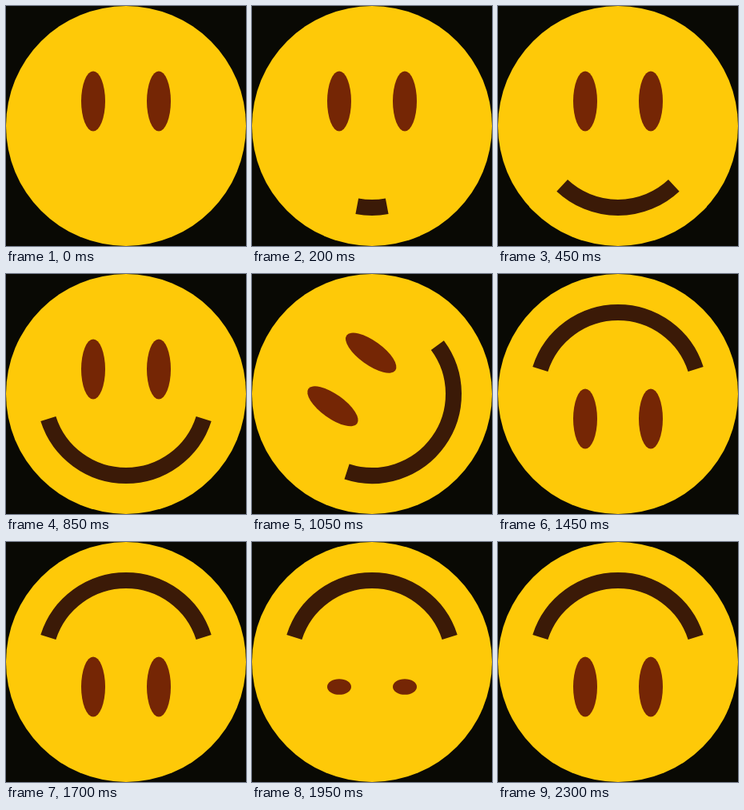
These frames come from a looping animation (300 px wide and 300 px high, 2350 ms). An HTML page:

```html
<!DOCTYPE html>
<html lang="en">
<head>
<meta charset="utf-8">
<title>Smiley</title>
<style>
  html, body { margin: 0; width: 100%; height: 100%; overflow: hidden; background: #090904; }
  svg { display: block; width: 100vw; height: 100vh; }
</style>
</head>
<body>
<svg viewBox="-150 -150 300 300">
  <circle r="150" fill="#fec908"/>
  <g id="face">
    <ellipse class="eye" cx="-41" cy="-31" rx="15" fill="#752605"/>
    <ellipse class="eye" cx="41" cy="-31" rx="15" fill="#752605"/>
    <path id="smile" fill="none" stroke="#3b1a07" stroke-width="20"/>
  </g>
</svg>
<script>
const LOOP = 2350, STEP = 50;
const SMILE_RADIUS = 102, SMILE_HALF_ANGLE = 72.3;
const EYE_HEIGHT = 37.5, EYE_CLOSED = 0.26;
const face = document.getElementById('face');
const smile = document.getElementById('smile');
const eyes = document.querySelectorAll('.eye');

const progress = (t, start, end) => Math.min(1, Math.max(0, (t - start) / (end - start)));
const ease = p => (1 - Math.cos(Math.PI * p)) / 2;
const tween = (t, start, end) => ease(progress(t, start, end));

function smilePath(degrees) {
  const a = degrees * Math.PI / 180;
  const x = SMILE_RADIUS * Math.sin(a), y = SMILE_RADIUS * Math.cos(a);
  return `M${-x} ${y}A${SMILE_RADIUS} ${SMILE_RADIUS} 0 0 0 ${x} ${y}`;
}

function draw(t) {
  const grown = tween(t, 0, 800);
  smile.setAttribute('d', grown ? smilePath(SMILE_HALF_ANGLE * grown) : '');

  face.setAttribute('transform', `rotate(${-180 * tween(t, 850, 1390)})`);

  const closed = tween(t, 1800, 1950) - tween(t, 1950, 2100);
  const height = EYE_HEIGHT * (1 - (1 - EYE_CLOSED) * closed);
  eyes.forEach(eye => eye.setAttribute('ry', height));
}

function tick() {
  const t = performance.now() % LOOP;
  draw(Math.floor(t / STEP) * STEP);
  requestAnimationFrame(tick);
}
tick();
</script>
</body>
</html>
```
